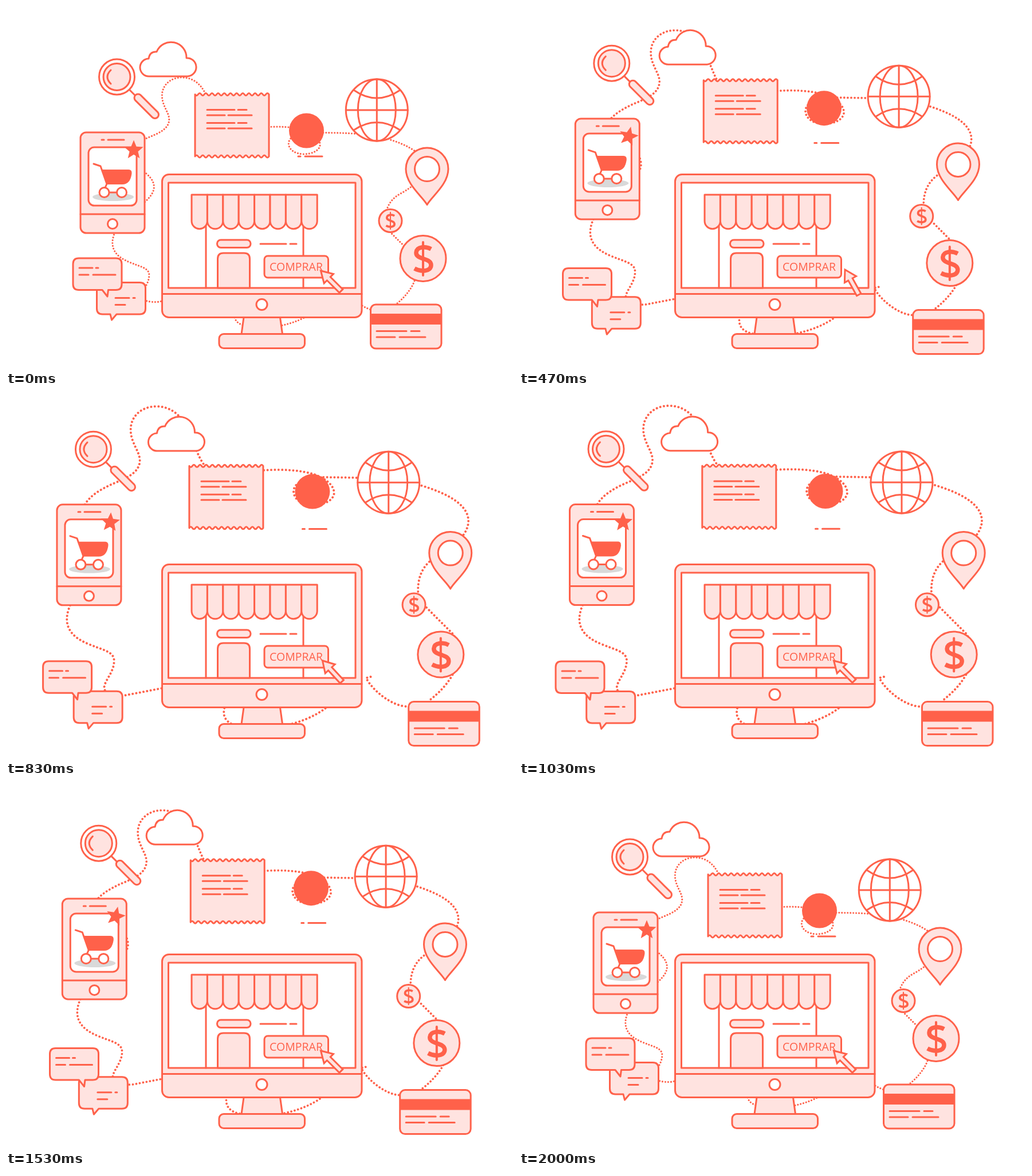
An HTML page that plays this animation: 885 px wide and 633 px high, repeating every 2030 ms.

```html
<!DOCTYPE html>
<html lang="es">
<head>
<meta charset="utf-8">
<title>Tienda en línea</title>
<style>
  html, body { margin: 0; width: 100%; height: 100%; overflow: hidden; background: #fff; }
  svg { display: block; width: 885px; height: 633px; }
  #stage { fill: #ffe3e0; stroke: #ff614a; stroke-width: 3; stroke-linejoin: round; stroke-linecap: round; }
  .w { fill: #fff; }
  .n { fill: none; }
  .r { fill: #ff614a; }
  .s { stroke: none; }
  #trail { fill: none; stroke-width: 4; stroke-dasharray: .01 6.4; }
  text { font: 19.5px "Open Sans", "Noto Sans", sans-serif; fill: #ff614a; stroke: none; text-anchor: middle; }
</style>
</head>
<body>
<svg viewBox="0 0 885 633">
<defs>
  <g id="dollar">
    <path class="n" stroke-width="7.5" stroke-linecap="butt" d="M14-17C5-22-11-22-12-11C-13 2 14-2 14 11C14 23-4 23-15 17"/>
    <path stroke-width="4" d="M0-29V29"/>
  </g>
</defs>
<g id="stage">
  <g id="trail">
    <path d="M137 189C145 174 165 162 185 153C208 143 234 134 233 110C232 95 217 80 217 58C217 35 235 17 262 17C285 17 303 30 314 52C326 75 335 108 347 121C370 133 410 130 449 129C480 127 512 128 538 136C560 144 573 156 573 169C572 182 555 190 535 190C516 189 502 180 502 165C504 148 528 141 552 141L612 142C650 143 690 146 723 155C750 163 808 182 808 218C808 240 785 262 756 278C735 289 718 308 720 345L733 368L780 415C795 435 795 460 780 488C770 505 757 519 740 532"/>
    <path d="M137 189C145 220 199 230 199 265C197 300 125 325 109 371C98 402 113 421 142 433C167 444 188 446 188 463C188 485 168 500 171 513C176 522 190 524 207 523.500L272 511"/>
    <path d="M381 546C377 562 386 572 400 576C450 590 520 575 558 546"/>
    <path d="M637 491L629 493C640 515 675 543 701 543"/>
  </g>

  <g data-move="14.6 -27.200">
    <path class="w" d="M250 123A15.500 15.500 0 0 1 249 92Q251 79 263 80A27 27 0 0 1 315 91A16 16 0 0 1 317 123Z"/>
  </g>

  <g data-move="-41.500 -31.200">
    <path d="M215 146L227 158"/>
    <circle class="w" cx="193.500" cy="124" r="31"/>
    <circle cx="193.500" cy="124" r="23.500"/>
    <path class="n" d="M183 112Q171 124 183 136"/>
    <path stroke-width="16" d="M230.500 160.500L260 190"/>
    <path stroke="#ffe3e0" stroke-width="10" d="M230.500 160.500L260 190"/>
  </g>

  <g data-move="-10.200 -32.500">
    <path id="receipt"/>
    <path d="M351 181.500H399M405 181.500H420M351 191H382M388 191H429M351 204.500H399M405 204.500H420M351 214H382M388 214H429"/>
  </g>

  <g data-move="10.500 -51.500"><circle class="r s" cx="524.500" cy="218" r="30.500"/></g>
  <g data-move="7.500 -30.800"><path d="M510 263H514M522 263H552"/></g>

  <g data-move="20.700 -31">
    <circle class="w" cx="647.300" cy="182" r="54"/>
    <ellipse class="n" cx="647.300" cy="182" rx="33" ry="54"/>
    <path class="n" d="M647.300 128V236M593.300 182H701.300M607 147Q647 175 688 147M607 217Q647 190 688 217"/>
  </g>

  <g data-move="41.200 -10.500">
    <path d="M735 347.500C727 333 698 312 698 285A37 37 0 0 1 772 285C772 312 743 333 735 347.500Z"/>
    <circle class="w" cx="735" cy="285" r="21.500"/>
  </g>

  <g data-move="41.500 -10.500">
    <circle cx="671" cy="375.500" r="20"/>
    <use href="#dollar" transform="translate(671 375.500) scale(.51)"/>
  </g>

  <g data-move="31.200 10.600">
    <circle cx="728" cy="441.500" r="40"/>
    <use href="#dollar" transform="translate(728 442)"/>
  </g>

  <g data-move="67 12.600">
    <rect x="636.500" y="522" width="123.500" height="77" rx="9"/>
    <path class="r s" d="M636 538H760V557H636Z"/>
    <path d="M647 568.500H699M707 568.500H722M647 579H679M687 579H732"/>
  </g>

  <g data-move="-40.800 33">
    <path d="M168.500 483.500H233.500Q243.500 483.500 243.500 493.500V529Q243.500 539 233.500 539H193L184.500 549L182 539H168.500Q158.500 539 158.500 529V493.500Q158.500 483.500 168.500 483.500Z"/>
    <path d="M191 510.500H215M222 510.500H225M191 522.500H208"/>
  </g>

  <g data-move="-53 23">
    <path d="M127 441H192Q202 441 202 451V486.500Q202 496.500 192 496.500H178.500L177 508L168 496.500H127Q117 496.500 117 486.500V451Q117 441 127 441Z"/>
    <path d="M128 458H151M157 458H161M128 470H144M152 470H191"/>
  </g>

  <g data-move="-41.500 -31.500">
    <rect x="130" y="221" width="112" height="176" rx="10"/>
    <path d="M130 364H242M167 234H171M178 234H206"/>
    <circle class="w" cx="186" cy="381" r="8.500"/>
    <rect class="w" x="144" y="247" width="84" height="102" rx="10"/>
    <ellipse class="s" fill="#d9d9d9" cx="187" cy="334" rx="36" ry="7"/>
    <path class="n" d="M153 276L165 280L176 311L172 320M172 326H202"/>
    <path class="r s" d="M167 286H214Q220 286 219.500 293Q217 312 203 312H175Z"/>
    <circle class="w" cx="171.500" cy="326" r="8.500"/>
    <circle class="w" cx="202" cy="326" r="8.500"/>
    <path id="star" class="r s"/>
  </g>

  <rect x="272.500" y="294.500" width="348.500" height="250" rx="12"/>
  <path d="M272.500 503.500H621"/>
  <rect class="w" x="283.500" y="309" width="326.500" height="184"/>
  <circle class="w" cx="446.500" cy="522" r="9.500"/>
  <path d="M415 544.500H478.500L482.500 573.500H411Z"/>
  <rect x="372" y="573.500" width="149.500" height="25" rx="8"/>

  <path d="M349 380V493M519 380V493"/>
  <g id="awning"></g>
  <rect x="368.500" y="409" width="58.500" height="13.500" rx="6.500"/>
  <path d="M444 416H489M496 416H507"/>
  <path d="M369.500 493V442Q369.500 432 379.500 432H415.500Q425.500 432 425.500 442V493Z"/>
  <rect x="451" y="437" width="111.500" height="38" rx="6"/>
  <text x="506.500" y="463">COMPRAR</text>
  <path id="cursor" stroke-linejoin="miter" d="M0 0L11.500 19.500H4.200V50H-4.200V19.500H-11.500Z"/>
</g>
</svg>
<script>
  const LOOP = 2030, HALF = 1000;
  const $ = id => document.getElementById(id);
  const place = (el, value) => el.setAttribute("transform", value);

  // Slow start, fast middle, long settle: cubic-bezier(.715, 0, 0, 1)
  function ease(x) {
    if (x <= 0) return 0;
    if (x >= 1) return 1;
    let lo = 0, hi = 1;
    for (let i = 0; i < 24; i++) {
      const s = (lo + hi) / 2;
      if (2.145 * s * (1 - s) ** 2 + s ** 3 < x) lo = s; else hi = s;
    }
    return lo * lo * (3 - 2 * lo);
  }

  const wave = (step, bend) => `q${step / 4} ${bend} ${step / 2} 0t${step / 2} 0`.repeat(12);
  $("receipt").setAttribute("d",
    `M330 154.500${wave(10.75, 4)}V263${wave(-10.75, 4)}Z`);

  const points = Array.from({ length: 10 }, (_, i) => {
    const r = i % 2 ? 7.8 : 17.5, a = (i * 36 - 90) * Math.PI / 180;
    return `${r * Math.cos(a)} ${r * Math.sin(a)}`;
  });
  $("star").setAttribute("d", `M${points.join("L")}Z`);

  const stripe = 27.4;
  $("awning").innerHTML = Array.from({ length: 8 }, (_, i) =>
    `<path d="M${324 + i * stripe} 330h${stripe}V376a13.7 13.7 0 0 1 ${-stripe} 0Z"/>`).join("");

  const movers = [...document.querySelectorAll("[data-move]")].map(el => ({
    el, by: el.dataset.move.split(" ").map(Number)
  }));

  function draw(t) {
    const p = ease(1 - Math.abs(t - HALF) / HALF);
    for (const { el, by } of movers) place(el, `translate(${by[0] * p} ${by[1] * p})`);
    const k = 0.775 + 0.225 * p;
    place($("trail"), `translate(463 497) scale(${k}) translate(-463 -497)`);
    place($("star"), `translate(223 252) rotate(${-360 * p})`);

    const c = ease(t / 450) - ease((t - 570) / 500);
    place($("cursor"), `translate(${549.5 + 19.5 * c} ${463 - 2 * c}) rotate(${-45 + 16 * c})`);
  }

  // Thirty steps per second, each starting on a 10 ms tick
  const start = performance.now();
  function tick() {
    const t = Math.max(0, performance.now() - start) % LOOP;
    const step = Math.floor((Math.floor(t / 10) + 0.5) * 0.3);
    draw(step * 100 / 3);
    requestAnimationFrame(tick);
  }
  draw(0);
  requestAnimationFrame(tick);
</script>
</body>
</html>
```
